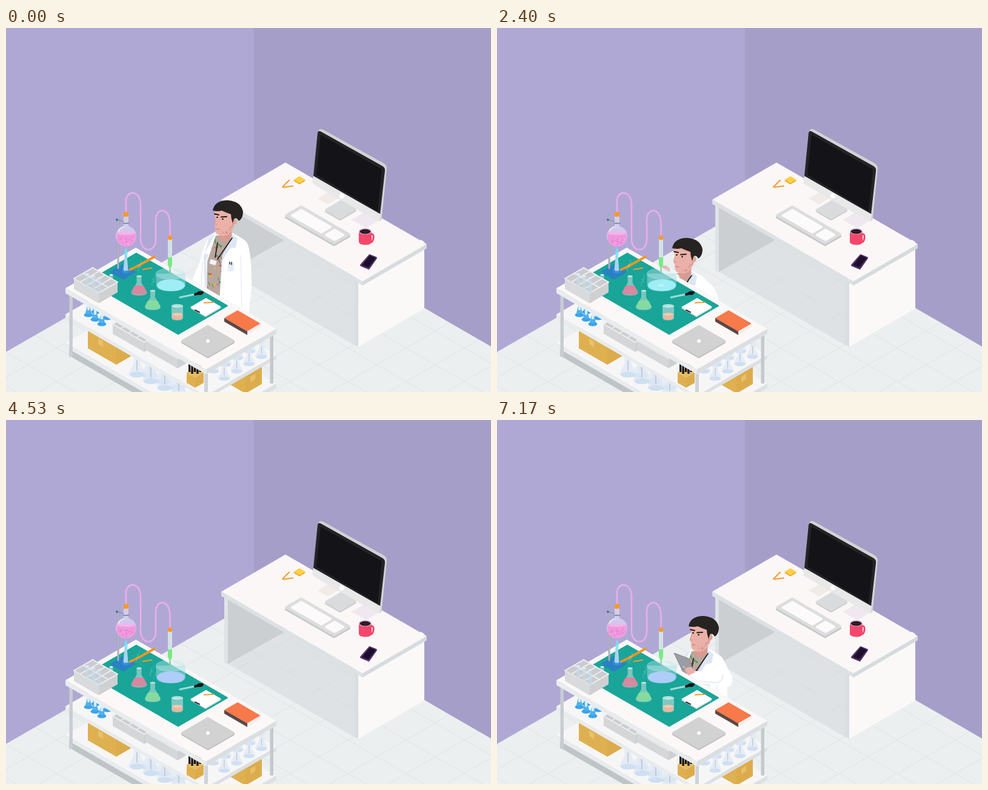
Write an HTML page that moves like this. It is 800 px wide and 600 px high and loops after 7200 ms.

```html
<!DOCTYPE html>
<html lang="en">
<head>
<meta charset="utf-8">
<title>Isometric lab</title>
<style>
html, body { margin: 0; width: 100%; height: 100%; overflow: hidden; background: #ebeff0; }
svg { display: block; width: 800px; height: 600px; }
</style>
</head>
<body>
<svg id="stage" viewBox="0 0 800 600"></svg>
<script>
const SLOPE = 0.577, LOOP = 7200;

// Markup helpers
const poly = (pts, fill, extra = '') => `<polygon points="${pts}" fill="${fill}" ${extra}/>`;
const path = (d, fill, extra = '') => `<path d="${d}" fill="${fill}" ${extra}/>`;
const line = (d, color, width = 1, extra = '') =>
  path(d, 'none', `stroke="${color}" stroke-width="${width}" stroke-linecap="round" ${extra}`);
const oval = (x, y, rx, ry, fill, extra = '') =>
  `<ellipse cx="${x}" cy="${y}" rx="${rx}" ry="${ry}" fill="${fill}" ${extra}/>`;
const dot = (x, y, r, fill) => oval(x, y, r, r, fill);
const rect = (x, y, w, h, fill, extra = '') =>
  `<rect x="${x}" y="${y}" width="${w}" height="${h}" fill="${fill}" ${extra}/>`;
const group = (content, extra = '') => `<g ${extra}>${content}</g>`;
const repeat = (n, make) => Array.from({ length: n }, (_, i) => make(i)).join('');

function random(seed) {
  return () => (seed = seed * 16807 % 2147483647) / 2147483647;
}

// Flat isometric tile: left corner, length down-right, length up-right, corner rounding
function tile(x, y, a, b, fill, round = 0) {
  const l = x + round, fa = a - round, fb = b - round;
  return poly([l, y, l + fa, y + fa * SLOPE, l + fa + fb, y + (fa - fb) * SLOPE, l + fb, y - fb * SLOPE],
    fill, round ? `stroke="${fill}" stroke-width="${round * 2}" stroke-linejoin="round"` : '');
}

// Isometric block standing below such a tile
function block(x, y, a, b, h, top, left, right) {
  const fx = x + a, fy = y + a * SLOPE, rx = fx + b, ry = fy - b * SLOPE;
  return tile(x, y, a, b, top) +
    poly([x, y, fx, fy, fx, fy + h, x, y + h], left) +
    poly([fx, fy, rx, ry, rx, ry + h, fx, fy + h], right);
}

function rack(x, y, a, b, h, cols) {
  const bar = (dx, dy, lx, ly) => line(`M${x + dx} ${y + dy}l${lx} ${ly}`, '#ececed', 2);
  return block(x, y, a, b, h, '#cbccd0', '#d5d6d7', '#cfd0d2') +
    repeat(cols + 1, i => bar(a * i / cols, a * SLOPE * i / cols, b, -b * SLOPE)) +
    repeat(3, i => bar(b * i / 2, -b * SLOPE * i / 2, a, a * SLOPE));
}

function conical(x, y, color) {
  return path(`M${x - 4} ${y}v11l-9 16q0 5 13 5t13 -5l-9 -16v-11z`, '#b7dcd8', 'opacity=".6"') +
    path(`M${x - 9} ${y + 18}l-4 8q0 5 13 5t13 -5l-4 -8z`, color, 'opacity=".85"') +
    oval(x, y + 18, 9, 2.6, color) + oval(x, y, 4.2, 1.6, '#d7efec', 'opacity=".8"');
}

// Flask with a round foot, seen on the shelves
function clearFlask(x, y, size = 1) {
  return group(path('M-4 -27v14l-6 12q0 5 10 5t10 -5l-6 -12v-14z', '#dfe8f4', 'opacity=".75"') +
    oval(0, 1, 9, 3.5, '#cfdff2') + line('M0 -16v12', '#b4becb') + oval(0, -27, 4, 1.5, '#f2f7fc'),
    `transform="translate(${x} ${y}) scale(${size})"`);
}

function room() {
  const reach = 900, drop = reach * SLOPE;
  const tiles = repeat(26, i => {
    const x = (i - 12) * 96 + 36;
    return line(`M${x - reach} ${555 - drop}L${x + reach} ${555 + drop}` +
      `M${x - reach} ${555 + drop}L${x + reach} ${555 - drop}`, '#dfe3e4');
  });
  return rect(0, 0, 800, 600, '#ebeff0') + tiles +
    poly('0,0 409,0 409,299 0,534', '#afa8d5') + poly('409,0 800,0 800,525 409,299', '#a59ec8');
}

function monitor() {
  return tile(514, 281, 17, 22, '#f0ebe6') + tile(570, 316, 24, 27, '#f0e8f0') +
    tile(526, 302, 25, 27, '#c9cbcc', 2) + tile(526, 300, 25, 27, '#dadbdc', 2) +
    path('M516 168Q519 165 524 168L623 223Q629 227 628 233L620 312Q619 319 615 318L508 255Z', '#d3d3d4') +
    path('M514 173Q515 168 520 171L620 227Q626 230 625 236L617 307L507 244Z', '#242427') +
    poly('519,176 620,233 613,302 512,242', '#131318') +
    path('M507 244L618 307L617 316Q616 320 612 318L508 258Q505 256 505.5 252Z', '#e8e8e9') +
    dot(554, 277, 4, '#fff');
}

function desk() {
  return poly('366,402 460,348 575,414 575,523', '#d4d9da', 'opacity=".55"') +
    poly('366,290 462,342 460,349 366,402', '#cbcfd2') +
    poly('360,288 366,291 366,403 360,400', '#dfe3e6') +
    block(575, 412, 6, 109, 110, '#fff', '#d9dee3', '#fbf8f8') +
    block(355, 283, 233, 106, 7, '#fbf7f7', '#dce1e4', '#d6dbde') +
    monitor() +
    // Keyboard and trackpad
    tile(460, 312, 81, 27, '#c6c8c9', 2) + tile(460, 309, 81, 27, '#dcddde', 2) +
    tile(470, 309, 50, 17, '#fcfafa', 2) + tile(526, 341, 16, 16, '#fcfafa', 2) +
    // Mug
    line('M602 340Q607 339 606 346T602 353', '#f04468', 3) +
    path('M582 335V353Q583 357 592 357.500T603 353V335Z', '#f5476b') +
    oval(592.5, 335, 10.8, 5.2, '#c5d0e6') + oval(592.5, 335.5, 9, 4, '#3a1626') +
    // Phone, pencils, sticky notes
    poly('600,375 610,379 598,396 586,391', '#56306c', 'stroke="#56306c" stroke-width="4" stroke-linejoin="round"') +
    poly('600,375 610,379 598,395 587,391', '#1d0f2b') +
    line('M456 262L467 251M458 262.500L473 260.500', '#f59a2c', 2) +
    tile(474, 252, 10, 10, '#f5a32a') + tile(474, 250, 10, 10, '#fdd04a');
}

function shelves() {
  const wood = ['#e6bd62', '#dfb050', '#dcac4c'], board = ['#f7f6f7', '#e9ecee', '#dce0e3'];
  const stopper = (x, y) => oval(x, y, 7.5, 3.5, '#3ba3ea') +
    path(`M${x - 2} ${y - 15}h4l3 12q-5 3 -10 0z`, '#4fb1ee') + rect(x - 2, y - 16, 4, 8, '#d8ecfa');
  return poly('104,540 104,520 300,604 215,604', '#bfc4c6') +
    block(98, 519, 232, 116, 7, ...board) +
    block(135, 495, 47, 26, 33, ...wood) + poly('152,512 160,517 160,526 152,521', '#e8c26d') +
    repeat(3, i => clearFlask(237 + i * 23, 572 + i * 10, 1.35)) +
    repeat(4, i => clearFlask(216 + i * 23, 570 + i * 11, 1.35)) +
    block(370, 556, 25, 27, 32, ...wood) + poly('403,575 411,570 411,579 403,584', '#e8bf68') +
    block(98, 472, 232, 116, 6, ...board) +
    repeat(2, i => stopper(148 + i * 19, 468 + i * 10)) +
    repeat(3, i => stopper(136 + i * 11, 473 + i * 7.5)) +
    rack(176, 488, 52, 14, 16, 4) + rack(231, 515, 52, 14, 16, 4) +
    block(298, 568, 14, 14, 17, ...wood) +
    repeat(5, i => rect(301 + i * 4.4, 552, 3.4, 15 + 3 * (i % 2), '#161416')) +
    repeat(4, i => clearFlask(342 + i * 20, 565 - i * 11)) +
    repeat(4, i => clearFlask(360 + i * 20.5, 577 - i * 12)) +
    rect(104.5, 440, 5.5, 102, '#c8cdd2') + rect(435.5, 500, 5.5, 86, '#c3c9cd') +
    rect(327, 565, 6, 35, '#cfd4d8');
}

function tableTop() {
  const tube = (x, y, h) => path(`M${x - 3} ${y}v${h}q3 4 6 0v${-h}z`, '#c3dcec', 'opacity=".6"') +
    oval(x, y, 3, 1.3, '#e6f1f8');
  return block(98, 429, 232, 116, 8, '#fbf8f7', '#e9ecee', '#dbdfe2') +
    tile(133, 418, 151, 82, '#1aa599', 1) +
    // Test tube rack
    tube(173.5, 407, 17) + rack(112, 413, 41, 31, 17, 4) +
    repeat(3, i => tube(134 + i * 10, 406 + i * 3, 24)) +
    poly('112,413 153,436.700 153,453.700 112,430', '#dadbdc', 'opacity=".75"') +
    // Book, laptop, notepad
    block(360, 478, 38, 22, 6, '#f8794a', '#5b4745', '#f3efee') +
    tile(289, 518, 44, 44, '#bcbdbe', 2) + tile(289, 516, 44, 44, '#d2d2d3', 2) +
    dot(333, 516, 3, '#fff') +
    tile(304, 462, 25, 26, '#d5dadb') + tile(304, 460, 25, 26, '#fff') +
    line('M312 465L319 468.500', '#333', 2) + line('M327 453L343 452', '#f59a2c', 2.2) +
    line('M226 398L240 395.500', '#f59a2c', 2.2) +
    // Dropper
    line('M287 444L311 439', '#9edbd8', 3) + line('M312 439L324 436', '#171518', 4) +
    oval(320, 437, 5, 3.2, '#171518');
}

function apparatus() {
  const tube = 'M198 304V285C198 267 222 266 222 292V348C222 370 247 372 247 348V317C247 294 270.500 296 270.500 322V345';
  return tile(171, 402, 22, 22, '#2a80c4') +
    line('M185 309V396', '#989daf', 3) + line('M185 309V396', '#c3c6d2', 1.2) +
    line('M182 316L203 321', '#8e99ae', 1.6) + dot(183, 316, 2, '#3d74a8') +
    // Burner
    line('M199 401L216 393L245 377', '#f5951f', 3.8) + oval(198, 401, 7, 3.6, '#2c94da') +
    path('M195.500 376h4l2 23q-4 3 -8 0z', '#a9d4ee') +
    path('M198 361Q202 370 199.500 378H196Q193.500 370 198 361Z', '#71e3f4', 'id="flame" opacity=".85"') +
    // Round flask
    rect(194, 306, 8, 24, '#d9d5ef', 'opacity=".85"') + oval(198, 343, 17, 17, '#d5cff0', 'opacity=".88"') +
    path('M182.500 338H213.500A16 16 0 0 1 182.500 349Z', '#f09ade') + oval(198, 338, 15.4, 3, '#f0b6ea') +
    group('', 'id="bubbles"') + line('M186 335Q188 329 194 328', '#fff', 1.4, 'opacity=".7"') +
    line('M194 322H202', '#727b92', 1.4) +
    line(tube, '#cf9fe0', 4.2) + line(tube, '#e1bdec', 1.6) +
    rect(194, 303, 8, 8, '#f79a2d', 'rx="1.5"') +
    // Burette
    path('M267 348V390L269.500 398V404H271.500V398L274 390V348Z', '#d6e8e6', 'opacity=".9"') +
    path('M267 378H274V390L271.500 397H269.500L267 390Z', '#79ea84') + rect(269.7, 397, 1.8, 7, '#57a58a') +
    rect(267, 342, 7, 7, '#f79a2d', 'rx="1.5"') +
    // Dish
    path('M247.500 405V424Q249 434 272 434T296 424V405Z', '#a5dce2', 'opacity=".5"') +
    oval(272, 424, 23, 9.8, '#9eeef5', 'id="liquid"') +
    oval(272, 405, 24.4, 9, '#c3e9ea', 'opacity=".38" stroke="#e0f5f5" stroke-width="1.2"') +
    oval(271, 424, 3, 1.3, '#fff', 'id="ripple"') + oval(271, 405, 1.4, 2, '#6be486', 'id="drop"') +
    // Glassware on the mat
    conical(219.5, 409, '#e3809b') + conical(242, 433, '#86dd9c') +
    path('M273 458V478Q274 482 282.500 482T292 478V458Z', '#b5dcda', 'opacity=".65"') +
    path('M274 472V478Q275 481 282.500 481T291 478V472Z', '#e9b79e') + oval(282.5, 472, 8.5, 2.6, '#efc9b6') +
    oval(282.5, 458, 9.5, 3, '#d4ecea', 'opacity=".8"') +
    group('', 'id="steam"');
}

function head(skin) {
  const rnd = random(7);
  return path('M344 299H379L378 323Q374 335 366 341Q356 345 348 340Q344 336 345.500 329L343 324L345 316Z', skin) +
    repeat(34, () => {
      const x = 356 + rnd() * 20, jaw = 340 - Math.max(0, x - 364) * 1.2;
      return dot(x, jaw - rnd() * 6, 0.4, '#7b5852');
    }) +
    oval(377.5, 319, 3, 4.5, '#e2a399') +
    path('M341 301Q344 284 366 284Q388 286 391 303Q391 314 384 318Q380 311 376 315L374 322' +
      'Q371 314 371 307Q362 304 356 301Q350 303 341 301Z', '#262321') +
    line('M344 306.500L351 308M355 311.500L364 311', '#221d1c', 1.9) +
    dot(348.5, 312, 1.3, '#17120f') + dot(357.5, 315, 1.3, '#17120f') +
    line('M346 315L343.500 323L348 324', '#d08f86') + line('M347 331L352 332', '#b8776f', 1.2);
}

function scientist() {
  const rnd = random(23), colors = ['#e8503f', '#f7b32b', '#4c9a4e', '#e0679a'], skin = '#ebb1a8';
  const flowers = repeat(46, i => {
    const x = 330 + rnd() * 38, y = 346 + rnd() * 92;
    return i % 3 ? oval(x, y, 1.9, 1.7, colors[i % 4]) : line(`M${x} ${y}l2 5`, '#4c9a4e', 1.2);
  });
  return path('M346 337L334 347Q327 356 320 384L307 416L330 445L400 475L405 425Q405 365 397 353Q390 346 374 338Z', '#fff') +
    group(rect(325, 335, 50, 120, '#b8a79f') + flowers, 'clip-path="url(#shirt)"') +
    poly('346,338 334,347 328,371 334,374 330,385 332,435 328,432 326,375', '#dfe8f5') +
    path('M372 339L382 347L379 362L370 363L355 386L357 374L371 349Z', '#dce6f4') +
    line('M387 375L389 460M324 386L322 424', '#e5e9f1', 1.3) +
    rect(366, 387, 10, 14, '#e6edf7', 'rx="1"') + line('M369 386v3M372 386v4', '#30323a', 1.6) +
    poly('353,335 373,326 372,345 361,354 352,347', '#d99b91') +
    line('M373 346L349 381M349 354L345 378', '#222024', 1.8) +
    rect(336, 382, 11, 8, '#f6f5f5', 'rx="1.5" transform="rotate(18 341 386)" stroke="#bcbcc2" stroke-width=".8"') +
    // Arms holding the tablet
    group(path('M385 351Q399 353 404 367L413 384Q415 397 408 401L350 393L342 383L343 374L382 377Z', '#fff') +
      line('M350 391L386 394Q397 393 398 381', '#e3e8f0', 1.4) +
      poly('317,345 341,354 350,376 333,379', '#9b9da4', 'stroke="#85878e"') + dot(333, 368, 1.3, '#d7d8dc') +
      path('M335 371Q342 366 348 370L352 377L343 381Q336 380 335 371Z', skin), 'id="tabletArms"') +
    // Arm reaching for the burette
    group(path('M386 351Q410 355 418 386L392 400Z', '#fff') +
      path('M352 346L337 333L334 343L340 360L356 360Z', '#fff') +
      path('M321 333Q325 328 331 330L338 335L335 343L329 341Z', skin), 'id="reachArms"') +
    head(skin);
}

const stage = document.getElementById('stage');
stage.innerHTML = `<defs>
  <clipPath id="behind"><polygon points="0,0 800,0 800,702 214,361 0,361"/></clipPath>
  <clipPath id="shirt"><path d="M346 342L366 342L372 348L356 385L352 450L331 440L332 385Z"/></clipPath>
</defs>` + room() + desk() + shelves() +
  group(group(scientist(), 'id="man"'), 'clip-path="url(#behind)"') + tableTop() + apparatus();

const $ = id => document.getElementById(id);
const show = (id, on) => $(id).setAttribute('visibility', on ? 'visible' : 'hidden');
const ramp = (t, from, to) => Math.min(1, Math.max(0, (t - from) / (to - from)));
const step = (t, from, to) => {
  const p = ramp(t, from, to);
  return p < 0.5 ? 2 * p * p : 1 - 2 * (1 - p) * (1 - p);
};

// The scientist approaches, leans in, ducks behind the table and rises with the tablet
function position(t) {
  if (t > 5000) {
    const rise = step(t, 5260, 5900);
    return [-48 + 23 * rise, 132 - 93 * rise];
  }
  const walk = step(t, 40, 690), lean = step(t, 840, 1470);
  const stretch = step(t, 3800, 4020), duck = step(t, 4020, 4480);
  return [-20 * walk - 32 * lean, 36.5 * walk + 25.5 * lean - 14 * stretch + 137 * duck];
}

function bubbles(t) {
  const rnd = random(91);
  return repeat(30, i => {
    const life = (rnd() + t / 900) % 1, y = 357 - life * 13;
    const half = Math.sqrt(225 - (y - 343) ** 2) - 1;
    return dot(198 + (rnd() * 2 - 1) * half, y, 0.7, i % 4 ? '#dc62c4' : '#f8c4ee');
  });
}

function steam(t) {
  const wisp = (x, y) => repeat(3, i => {
    const life = (t / 1800 + i / 3) % 1;
    return line(`M${x + (i - 1) * 3} ${y - life * 18}q-3 -3 0 -6t0 -6`, '#d9f2ee', 1.2,
      `opacity="${0.25 * Math.sin(Math.PI * life)}"`);
  });
  return wisp(219, 407) + wisp(242, 431);
}

function draw(now) {
  const t = now % LOOP, [x, y] = position(t);
  $('man').setAttribute('transform', `translate(${x} ${y})`);
  show('reachArms', t > 1000 && t < 4500);
  show('tabletArms', t > 5200);

  const tint = ramp(t, 3550, 4350);
  $('liquid').setAttribute('fill', `rgb(${158 + 16 * tint},${238 - 33 * tint},${245 + 3 * tint})`);

  const fall = (t % 900) / 900, spread = fall - 0.5;
  $('drop').setAttribute('cy', 404 + 20 * Math.min(1, fall * 2) ** 2);
  show('drop', spread < 0);
  $('ripple').setAttribute('rx', 2 + Math.max(0, spread) * 16);
  $('ripple').setAttribute('ry', 1 + Math.max(0, spread) * 6);
  $('ripple').setAttribute('opacity', 0.5 - spread);
  show('ripple', spread >= 0);

  $('flame').setAttribute('transform', `translate(${0.4 * Math.sin(t / 45)} 0)`);
  $('bubbles').innerHTML = bubbles(t);
  $('steam').innerHTML = steam(t);
}

const start = performance.now();
function tick() {
  draw(performance.now() - start);
  requestAnimationFrame(tick);
}
tick();
</script>
</body>
</html>
```
